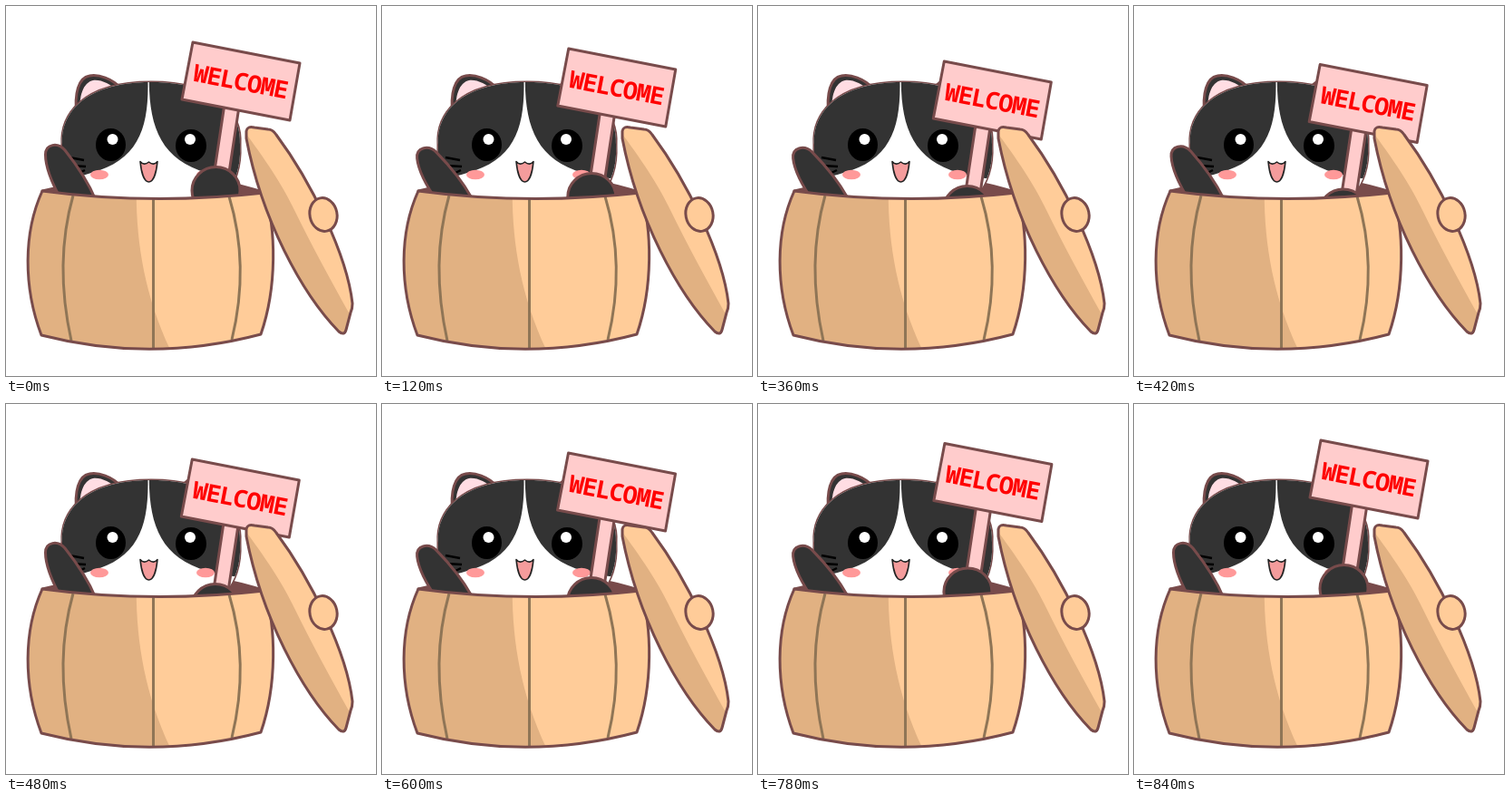
Animation of 408x408 px, one loop 0.9 s. Source, as an HTML page with a canvas:

```html
<!DOCTYPE html>
<html lang="en">
<head>
<meta charset="utf-8">
<title>Welcome cat</title>
<style>
html, body { margin: 0; width: 100%; height: 100%; overflow: hidden; background: #fff; }
canvas { display: block; width: 408px; height: 408px; }
</style>
</head>
<body>
<canvas id="stage" width="408" height="408"></canvas>
<script>
const ctx = document.getElementById('stage').getContext('2d');
const LINE = '#784b4b', FUR = '#333333', LIGHT = '#ffcc99', SHADE = '#e1b182';
const PINK = '#ffcccc', STAVE = '#8f7556', BLUSH = '#ff9999';
const STEP = 60, STEPS = 15;

const shapes = {
  inside: 'M40 204 C90 192 210 178 285 206 Q160 220 40 204Z',
  head: 'M62 153 C60 122 82 84 160 84 C238 84 260 122 258 153 C260 195 240 235 160 235 C80 235 60 195 62 153Z',
  leftPatch: 'M50 70 H156 C159 129 150 169 94 184 Q77 190 50 192Z',
  rightPatch: 'M270 70 H158 C156 129 168 169 222 184 Q243 190 270 192Z',
  ear: 'M78 121 C75 96 80 79 92 77 C102 75 117 80 127 91Z',
  earInside: 'M82 124 C79 98 86 84 96 82 C105 81 115 86 123 94Z',
  mouth: 'M148 171.5 Q152 176.5 157.5 172 Q163 176.5 167 171.5 C166 182 163 194 157.5 194 C152 194 149 182 148 171.5Z',
  whiskers: 'M70 167 L86 170 M71 176 L88 177 M77 186 L87 181',
  leftPaw: 'M61 214 C51 196 43.5 178 43.5 164 C43.5 152 57 150 65 159 C73 169 88 188 99 214Z',
  pole: 'M241 108 L257 111 L245 190 L229 188Z',
  board: 'M206 40 L324 63 L313 126 L194 103Z',
  barrel: 'M40 204 Q160 220 285 206 C298 245 299 310 281 362 Q160 394 39 363 C19 310 19 250 40 204Z',
  barrelShade: 'M0 190 H144 C142 255 152 320 184 385 H0Z',
  staves: 'M74 209 Q53 283 72 369 M162.5 213 V377 M246 210 Q269 286 249 368',
  lid: 'M265 138 Q266 132 274 134 L289 136 Q294 136 298 142 C336 193 376 274 382 328 Q382 334 380 338 L375 357 Q373 364 367 359 C326 317 282 235 265 146Z',
  lidShade: 'M255 130 L264 140 C290 175 306 200 318 225 C336 262 358 302 379 340 L370 380 L250 300Z'
};
const path = Object.fromEntries(Object.entries(shapes).map(([name, d]) => [name, new Path2D(d)]));

function fill(shape, color) {
  ctx.fillStyle = color;
  ctx.fill(shape);
}

function stroke(shape, color = LINE, width = 3) {
  ctx.strokeStyle = color;
  ctx.lineWidth = width;
  ctx.stroke(shape);
}

function outlined(shape, color) {
  fill(shape, color);
  stroke(shape);
}

function oval(x, y, rx, ry, turn = 0) {
  const shape = new Path2D();
  shape.ellipse(x, y, rx, ry, turn, 0, Math.PI * 2);
  return shape;
}

function clipped(shape, draw) {
  ctx.save();
  ctx.clip(shape);
  draw();
  ctx.restore();
}

function moved(x, y, draw) {
  ctx.save();
  ctx.translate(x, y);
  draw();
  ctx.restore();
}

function drawEar() {
  outlined(path.ear, FUR);
  fill(path.earInside, '#ffdde3');
}

function drawHead() {
  drawEar();
  ctx.save();
  ctx.translate(320, 0);
  ctx.scale(-1, 1);
  drawEar();
  ctx.restore();

  stroke(path.head);
  fill(path.head, '#fff');
  clipped(path.head, () => {
    fill(path.leftPatch, FUR);
    fill(path.rightPatch, FUR);
  });
  fill(oval(115.5, 153, 16.5, 18), '#000');
  fill(oval(204, 154, 17, 18), '#000');
  fill(oval(117.5, 147, 6, 6), '#fff');
  fill(oval(203, 147, 6, 6), '#fff');
  fill(oval(103, 186, 10, 5.3), BLUSH);
  fill(oval(220, 186, 10, 5.3), BLUSH);
  fill(path.mouth, '#f49c9c');
  stroke(path.mouth, '#222', 1.6);
  stroke(path.whiskers, '#000', 2.4);
}

function drawLeftPaw(wave) {
  ctx.save();
  ctx.translate(80, 212);
  ctx.rotate(-wave * Math.PI / 15);
  ctx.translate(-80, -212);
  outlined(path.leftPaw, FUR);
  ctx.restore();
}

function setLetterFont(size) {
  ctx.font = `900 extra-condensed ${size}px "Noto Sans Mono", "DejaVu Sans Mono", monospace`;
}

function drawLettering(text, maxSize, room) {
  setLetterFont(maxSize);
  ctx.letterSpacing = '-1px';
  setLetterFont(maxSize * Math.min(1, room / ctx.measureText(text).width));
  ctx.textAlign = 'center';
  ctx.textBaseline = 'middle';
  ctx.fillStyle = '#ff0000';
  ctx.fillText(text, 0, 0);
}

function drawSign() {
  outlined(path.pole, PINK);
  outlined(path.board, PINK);
  ctx.save();
  ctx.translate(258.5, 85);
  ctx.rotate(0.19);
  drawLettering('WELCOME', 37, 107);
  ctx.restore();
  outlined(oval(231.5, 203.5, 26.5, 26), FUR);
}

function drawBarrel() {
  fill(path.barrel, LIGHT);
  clipped(path.barrel, () => fill(path.barrelShade, SHADE));
  stroke(path.staves, STAVE);
  stroke(path.barrel);
}

function drawLid() {
  fill(path.lid, LIGHT);
  clipped(path.lid, () => fill(path.lidShade, SHADE));
  stroke(path.lid);
  outlined(oval(350, 230, 15, 18.5, -0.2), LIGHT);
}

function render(now) {
  const step = Math.floor(now / STEP) % STEPS;
  const drop = 3.5 * (7 - Math.abs(7 - step));
  // The last wave returns twice as fast.
  const wave = step > 12 ? (14 - step) / 2 : 1 - Math.abs(step % 8 - 4) / 4;

  ctx.fillStyle = '#fff';
  ctx.fillRect(0, 0, 408, 408);
  ctx.lineJoin = 'round';
  ctx.lineCap = 'butt';
  outlined(path.inside, LINE);
  drawHead();
  drawLeftPaw(wave);
  moved(-drop / 30, drop, drawSign);
  drawBarrel();
  drawLid();
}

function tick(now) {
  render(now);
  requestAnimationFrame(tick);
}
render(0);
requestAnimationFrame(tick);
</script>
</body>
</html>
```
